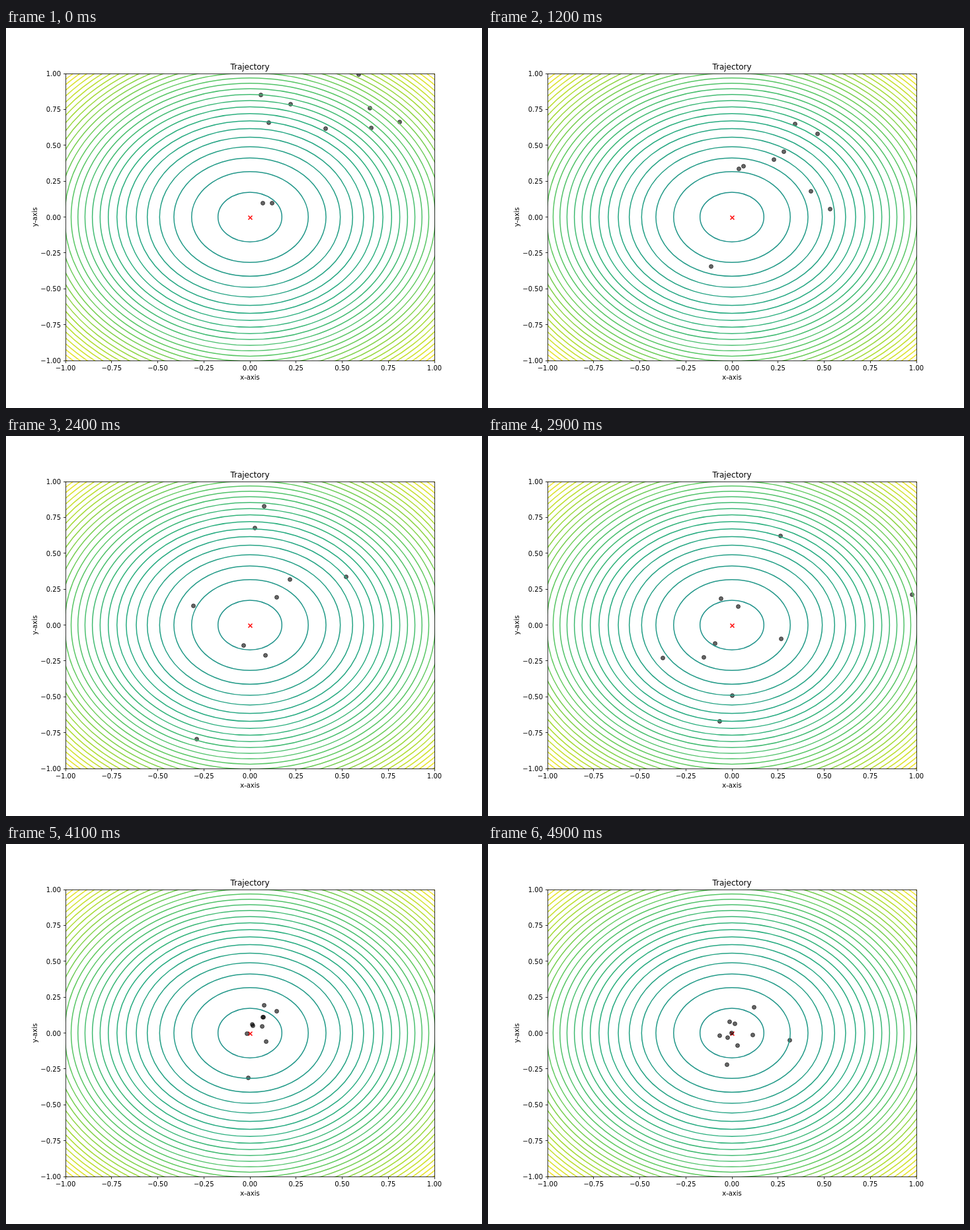
An HTML page with a canvas for the animation above (5000 ms loop, 720 by 576 pixels).

```html
<!DOCTYPE html>
<html lang="en">
<meta charset="utf-8">
<title>Trajectory</title>
<style>
  html, body { margin: 0; width: 720px; height: 576px; overflow: hidden; background: #fff; }
  canvas { display: block; }
</style>
<canvas width="720" height="576"></canvas>
<script>
const ctx = document.querySelector('canvas').getContext('2d');
const CX = 369, CY = 286.56, RX = 279, RY = 217.44;
const FONT = '"DejaVu Sans", sans-serif';

// Each particle swings around the optimum and loses speed, one step every 100 ms.
// Points: start, place after the first swing, place at rest.
const DAMP = 0.949, TURN = 0.66, MID = 12, END = 49;
const PARTICLES = [
  [533,70, 490,570, 456,297], [595,142, 517,274, 402,247],
  [552,151, 488,247, 400,289], [550,121, 498,160, 350,290],
  [385,101, 337,361, 361,334], [388,265, 379,213, 365,269],
  [402,265, 386,209, 373,272], [430,115, 464,145, 377,305],
  [397,143, 432,199, 362,293], [483,152, 447,187, 368,286]
];

// Damped swing from a to b in n steps; a linear drift takes up what the swing misses
function swing(a, b, n, k) {
  const decay = DAMP ** n, c = Math.cos(TURN * n), s = Math.sin(TURN * n);
  const amp = (b / decay - a * c) * s / (s * s + 0.1);
  const drift = b - decay * (a * c + amp * s);
  return DAMP ** k * (a * Math.cos(TURN * k) + amp * Math.sin(TURN * k)) + drift * k / n;
}

function place(points, step) {
  return [CX, CY].map((mid, d) => {
    const [a, b, c] = [0, 2, 4].map(i => points[i + d] - mid);
    const offset = step < MID ? swing(a, b, MID, step) : swing(b, c, END - MID, step - MID);
    return Math.round(mid + offset) + 0.5;
  });
}

// Upper half of the viridis colour map
const VIRIDIS = [[33,145,140], [40,174,128], [94,201,98], [173,220,48], [253,231,37]];
function viridis(v) {
  const p = (v - 0.5) * 8, i = Math.min(3, Math.floor(p));
  return `rgb(${VIRIDIS[i].map((c, k) => Math.round(c + (VIRIDIS[i + 1][k] - c) * (p - i)))})`;
}

function line(x1, y1, x2, y2) {
  ctx.beginPath();
  ctx.moveTo(x1, y1);
  ctx.lineTo(x2, y2);
  ctx.stroke();
}

function text(str, x, y, align = 'center', size = 10) {
  ctx.font = `${size}px ${FONT}`;
  ctx.textAlign = align;
  ctx.fillText(str, x, y);
}

function drawMark() {
  ctx.strokeStyle = 'red';
  ctx.lineWidth = 1.5;
  line(366.5, 284.5, 372.5, 290.5);
  line(366.5, 290.5, 372.5, 284.5);
}

function drawDots(step) {
  ctx.fillStyle = ctx.strokeStyle = 'rgba(0,0,0,.6)';
  ctx.lineWidth = 1;
  for (const points of PARTICLES) {
    ctx.beginPath();
    ctx.arc(...place(points, step), 3, 0, 7);
    ctx.fill();
    ctx.stroke();
  }
}

function drawContours() {
  ctx.lineWidth = 1.5;
  for (let level = 0.03; level < 2; level += 0.07) {
    const r = Math.sqrt(level);
    ctx.strokeStyle = viridis((level + 2) / 3.99);
    ctx.beginPath();
    ctx.ellipse(CX, CY, RX * r, RY * r, 0, 0, 2 * Math.PI);
    ctx.stroke();
  }
}

function drawAxes() {
  ctx.fillStyle = ctx.strokeStyle = '#000';
  ctx.lineWidth = 0.8;
  ctx.strokeRect(90.5, 69.5, 558, 435);
  for (let v = -1; v <= 1; v += 0.25) {
    const label = (v < 0 ? '\u2212' : '') + Math.abs(v).toFixed(2);
    const x = CX + RX * v, y = CY - RY * v;
    const px = Math.floor(x) + 0.5, py = Math.floor(y) + 0.5;
    line(px, 504.5, px, 508);
    line(87, py, 90.5, py);
    text(label, x, 519);
    text(label, 83, Math.round(y + 4), 'right');
  }
  text('x-axis', CX, 533);
  text('Trajectory', CX, 63, 'center', 12);
  ctx.save();
  ctx.translate(47, CY);
  ctx.rotate(-Math.PI / 2);
  text('y-axis', 0, 0);
  ctx.restore();
}

function frame() {
  const step = Math.floor(performance.now() % 5000 / 100);
  ctx.fillStyle = '#fff';
  ctx.fillRect(0, 0, 720, 576);
  ctx.save();
  ctx.beginPath();
  ctx.rect(90, 69, 559, 436);
  ctx.clip();
  drawMark();
  drawDots(step);
  drawContours();
  ctx.restore();
  drawAxes();
  requestAnimationFrame(frame);
}
frame();
</script>
</html>
```
